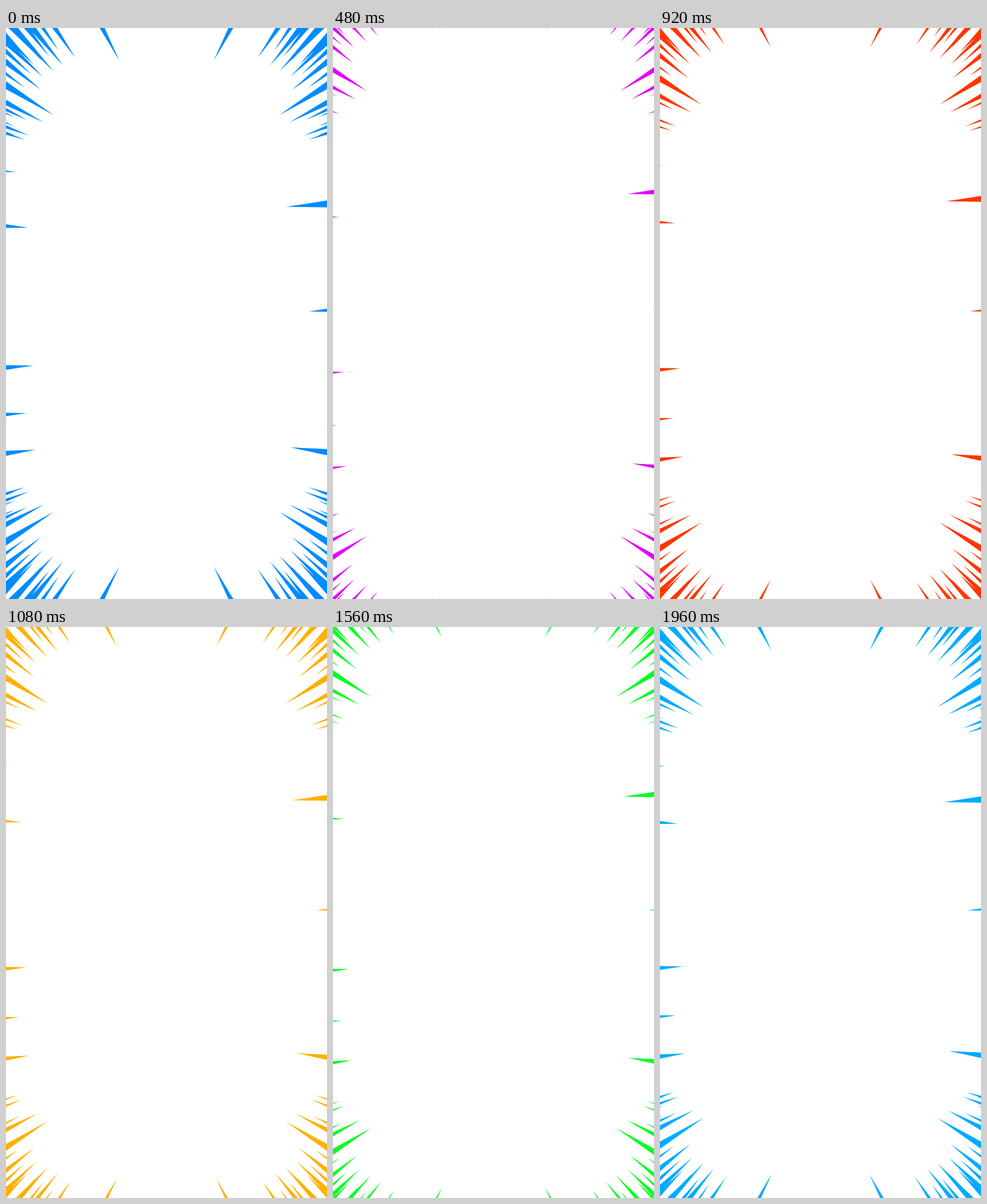
An HTML page that plays this animation: 561x998 px, repeating every 2000 ms.

```html
<!DOCTYPE html>
<html lang="en">
<head>
<meta charset="utf-8">
<title>Speed lines</title>
<style>
  html, body { margin: 0; width: 100%; height: 100%; overflow: hidden; background: #fff; }
  svg { display: block; width: 100vw; height: 100vh; }
</style>
</head>
<body>
<svg viewBox="0 0 561 998" preserveAspectRatio="none">
  <defs><path id="corner"/></defs>
  <g id="burst">
    <use href="#corner"/>
    <use href="#corner" transform="matrix(-1 0 0 1 561 0)"/>
    <use href="#corner" transform="matrix(1 0 0 -1 0 998)"/>
    <use href="#corner" transform="matrix(-1 0 0 -1 561 998)"/>
    <path id="sides"/>
  </g>
</svg>
<script>
const W = 561, H = 998;
const LOOP = 2000, STEP = 40, PULSES = 6;
const $ = id => document.getElementById(id);

// A wedge opening outwards from its tip; it lies flatter the further it is from the corner.
function ray([x, y], spread) {
  const right = x > W / 2, low = y > H / 2;
  const inX = right ? W - x : x, inY = low ? H - y : y;
  const lean = Math.max(4, 54 + 0.1 * inX - 0.2 * inY);
  const end = turn => {
    const a = (lean + turn) * Math.PI / 180;
    const dx = 150 * Math.cos(a), dy = 150 * Math.sin(a);
    return `${x + (right ? dx : -dx)} ${y + (low ? dy : -dy)}`;
  };
  return `M${x} ${y}L${end(-spread)}L${end(spread)}Z`;
}

const paint = (id, tips, spread) =>
  $(id).setAttribute("d", tips.map(tip => ray(tip, spread)).join(""));

const tips = [
  [198, 57], [121, 52], [100, 66], [83, 75.5], [64, 85], [44, 81], [61, 108],
  [33, 104.5], [83, 152], [66, 165], [37, 160.5], [40.5, 188], [33.5, 195.5]
];
const echoes = tips.slice(1, 5).map(([x, y]) => [x * 0.76, y * 0.76]);
const slivers = Array.from({ length: 4 }, (_, i) => [14 + i, 140 + 16 * i]);
paint("corner", [...tips, ...echoes, ...slivers], 3.4);

paint("sides", [
  [17, 252], [39, 349], [48, 590], [36, 673], [52, 737],
  [489.5, 312.5], [529, 495.5], [497, 733]
], 4.8);

function draw(now) {
  const t = Math.floor((now % LOOP) / STEP) * STEP;
  const phase = (t / LOOP * PULSES) % 1;
  // The pulse grows and shrinks in whole units of size.
  const size = Math.floor(58.1 + 16 * Math.min(phase, 1 - phase));
  const cx = W / 2, cy = H / 2;
  $("burst").setAttribute("transform",
    `translate(${cx} ${cy}) scale(${size / 58}) translate(${-cx} ${-cy})`);
  $("burst").setAttribute("fill", `hsl(${(207 + 360 * t / LOOP) % 360}, 100%, 50%)`);
}

const start = performance.now();
function tick() {
  draw(performance.now() - start);
  requestAnimationFrame(tick);
}
tick();
</script>
</body>
</html>
```
